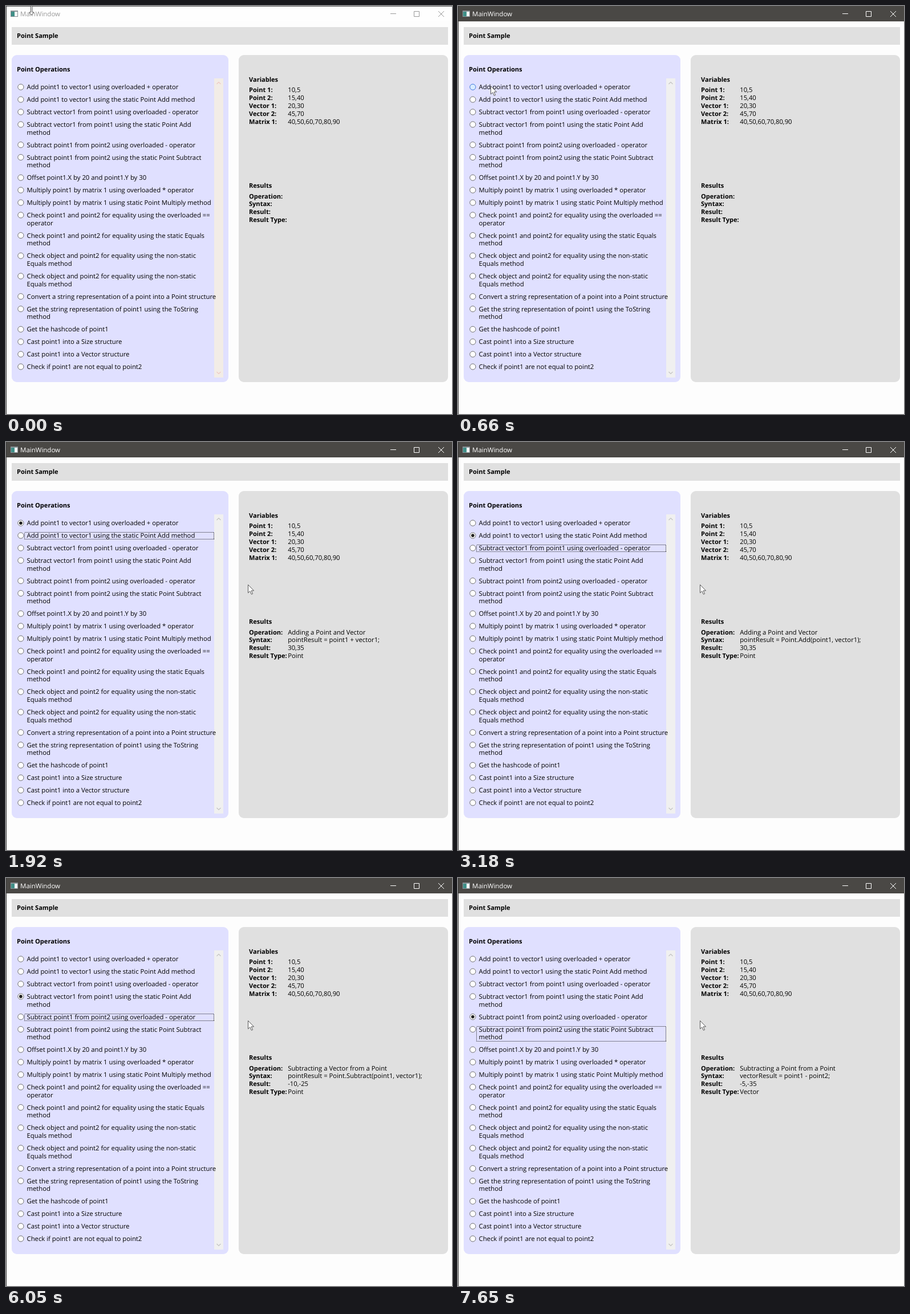
Recreate the animation shown at these times as an HTML page. Size 782x716 px, loop 8000 ms.

```html
<!DOCTYPE html>
<html lang="en">
<head>
<meta charset="utf-8">
<title>Point Sample</title>
<style>
  html, body { margin: 0; width: 100%; height: 100%; overflow: hidden; background: #fdfdfd; }
  svg { display: block; }
  text {
    font: 11.3px "Open Sans", "Noto Sans", sans-serif;
    fill: #000;
    text-rendering: geometricPrecision;
    white-space: pre;
  }
  .bold { font-weight: 700; font-size: 11.05px; }
  .title { font-size: 11.5px; }
  .crisp { shape-rendering: crispEdges; }
</style>
</head>
<body>
<svg id="stage" width="782" height="716" viewBox="0 0 782 716"></svg>
<script>
const LOOP = 8000;
const stage = document.getElementById('stage');

function add(tag, attrs, content) {
  const el = document.createElementNS('http://www.w3.org/2000/svg', tag);
  set(el, attrs);
  if (content) el.textContent = content;
  return stage.appendChild(el);
}
function set(el, attrs) {
  for (const key in attrs) el.setAttribute(key, attrs[key]);
}
const box = (x, y, width, height, fill, rx = 0) => add('rect', { x, y, width, height, fill, rx });
const line = (d, stroke, width = 1) => add('path', { d, stroke, 'stroke-width': width, fill: 'none' });
// y is the middle of the capitals
const label = (x, y, content, cls = '') => add('text', { x, y: y + 4, class: cls }, content);
const show = (el, on) => { el.style.display = on ? '' : 'none'; };

// Window frame
const titleBar = box(0, 0, 782, 27, '#4a4845');
const topEdge = box(0, 0, 782, 1, '#555');
box(0, 0, 1, 716, '#3c3c3c');
box(8, 8, 13, 11, '#8a9297');
box(9, 10, 11, 8, '#f4f6f6');
box(9, 10, 6, 8, '#3f8f88');
const title = label(25, 13.5, 'MainWindow', 'title');
const buttons = line('M674 13.5H684 M715.5 9.5H724.5V18.5H715.5Z M758 9L768 19M768 9L758 19', '#fff');

// Panels
box(10, 37, 765, 31, '#e0e0e0');
box(10, 86, 380, 574, '#e0e0ff', 9);
box(408, 86, 367, 574, '#e0e0e0', 9);
label(19, 52, 'Point Sample', 'bold');
label(19, 111, 'Point Operations', 'bold');
const scrollBar = box(365, 127, 16, 525, '#f0f0f0');
const chevrons = line('M369.5 137L373 133.5L376.5 137M369.5 642L373 645.5L376.5 642', '#c4c4c4', 1.2);

// Operations
const operations = [
  'Add point1 to vector1 using overloaded + operator',
  'Add point1 to vector1 using the static Point Add method',
  'Subtract vector1 from point1 using overloaded - operator',
  'Subtract vector1 from point1 using the static Point Add|method',
  'Subtract point1 from point2 using overloaded - operator',
  'Subtract point1 from point2 using the static Point Subtract|method',
  'Offset point1.X by 20 and point1.Y by 30',
  'Multiply point1 by matrix 1 using overloaded * operator',
  'Multiply point1 by matrix 1 using static Point Multiply method',
  'Check point1 and point2 for equality using the overloaded ==|operator',
  'Check point1 and point2 for equality using the static Equals|method',
  'Check object and point2 for equality using the non-static|Equals method',
  'Check object and point2 for equality using the non-static|Equals method',
  'Convert a string representation of a point into a Point structure',
  'Get the string representation of point1 using the ToString|method',
  'Get the hashcode of point1',
  'Cast point1 into a Size structure',
  'Cast point1 into a Vector structure',
  'Check if point1 are not equal to point2'
];
let nextY = 142.2;
const rows = operations.map(operation => {
  const y = nextY;
  const lines = operation.split('|');
  lines.forEach((content, i) => label(36.5, y + i * 13.8, content));
  nextY += 8.1 + 13.8 * lines.length;
  return {
    y, lines: lines.length,
    ring: add('circle', { cx: 25.9, cy: y, r: 5.1 }),
    dot: add('circle', { cx: 25.9, cy: y, r: 2.8, fill: '#212121' })
  };
});
const focusBox = add('rect', {
  x: 32.5, width: 332, fill: 'none', stroke: '#222', 'stroke-dasharray': '1 1', class: 'crisp'
});

// Variables and results
function table(y, heading, entries) {
  label(426, y, heading, 'bold');
  return entries.map(([name, value], i) => {
    const rowY = y + 18.2 + i * 13.9;
    label(426, rowY, name, 'bold');
    return label(494.2, rowY, value);
  });
}
table(129, 'Variables', [
  ['Point 1:', '10,5'], ['Point 2:', '15,40'], ['Vector 1:', '20,30'],
  ['Vector 2:', '45,70'], ['Matrix 1:', '40,50,60,70,80,90']
]);
const outputs = table(315.3, 'Results', [
  ['Operation:', ''], ['Syntax:', ''], ['Result:', ''], ['Result Type:', '']
]);
const results = [
  ['Adding a Point and Vector', 'pointResult = point1 + vector1;', '30,35', 'Point'],
  ['Adding a Point and Vector', 'pointResult = Point.Add(point1, vector1);', '30,35', 'Point'],
  ['Subtracting a Vector from a Point', 'pointResult = point1 - vector1;', '-10,-25', 'Point'],
  ['Subtracting a Vector from a Point', 'pointResult = Point.Subtract(point1, vector1);', '-10,-25', 'Point'],
  ['Subtracting a Point from a Point', 'vectorResult = point1 - point2;', '-5,-35', 'Vector']
];

// Pointers
const outline = { fill: '#fff', stroke: '#555', 'stroke-width': 1, 'stroke-linejoin': 'round' };
const arrow = add('path', {
  d: 'M.5 .5V14.8L3.8 11.7L6.4 17.3L8.6 16.3L6.1 10.9H10.6Z', ...outline
});
const resizer = add('path', {
  d: 'M43.5 0H46V11H49L44.7 16L40.5 11H43.5Z', ...outline
});

// Each step changes part of the state from its time on.
// The first click on a button also activates the window.
const steps = [
  [0, { active: false, pointer: null, hover: -1, pressed: -1, checked: -1, focus: -1 }],
  [90, { pointer: [45, 22] }],
  [200, { pointer: [48, 56] }],
  [320, { pointer: [52, 98] }],
  [430, { pointer: [55, 128] }],
  [550, { pointer: [57, 140], hover: 0 }],
  [660, { pressed: 0, active: true }],
  [770, { pressed: -1, checked: 0 }],
  [890, { pointer: [158, 158], hover: -1 }],
  [1000, { pointer: [432, 392] }],
  [1120, { pointer: [579, 518] }],
  [1580, { pointer: [553, 473] }],
  [1690, { pointer: [486, 357] }],
  [1810, { pointer: [424, 250] }],
  [1920, { focus: 1 }],
  [2380, { pressed: 1 }],
  [2490, { pressed: -1, checked: 1 }],
  [3180, { focus: 2 }],
  [3980, { pressed: 2 }],
  [4100, { pressed: -1, checked: 2 }],
  [4670, { focus: 3 }],
  [5360, { pressed: 3 }],
  [5590, { pressed: -1, checked: 3 }],
  [6050, { focus: 4 }],
  [6850, { pressed: 4 }],
  [7080, { pressed: -1, checked: 4 }],
  [7650, { focus: 5 }]
];

function stateAt(time) {
  return Object.assign({}, ...steps.filter(([start]) => start <= time).map(step => step[1]));
}

function draw(time) {
  const { active, pointer, hover, pressed, checked, focus } = stateAt(time);
  set(titleBar, { fill: active ? '#4a4845' : '#fefefe' });
  show(topEdge, !active);
  title.style.fill = active ? '#fff' : '#999';
  set(buttons, { stroke: active ? '#fff' : '#999' });
  set(scrollBar, { fill: active ? '#f0f0f0' : '#f2ece6' });
  set(chevrons, { stroke: active ? '#c4c4c4' : '#efc9c4' });

  rows.forEach(({ ring, dot }, i) => {
    const [fill, stroke] = i === pressed ? ['#d9ecff', '#3c77dd']
      : i === hover ? ['#f3f9ff', '#5593ff'] : ['#fff', '#707070'];
    set(ring, { fill, stroke });
    show(dot, i === checked);
  });

  show(focusBox, focus >= 0);
  if (focus >= 0) {
    const { y, lines } = rows[focus];
    set(focusBox, { y: Math.round(y - 6) + .5, height: lines > 1 ? 26 : 12 });
  }

  outputs.forEach((el, i) => { el.textContent = checked < 0 ? '' : results[checked][i]; });
  show(arrow, pointer);
  show(resizer, !pointer);
  if (pointer) set(arrow, { transform: `translate(${pointer})` });
}

const begin = performance.now();
function tick() {
  draw((performance.now() - begin) % LOOP);
  requestAnimationFrame(tick);
}
tick();
</script>
</body>
</html>
```
